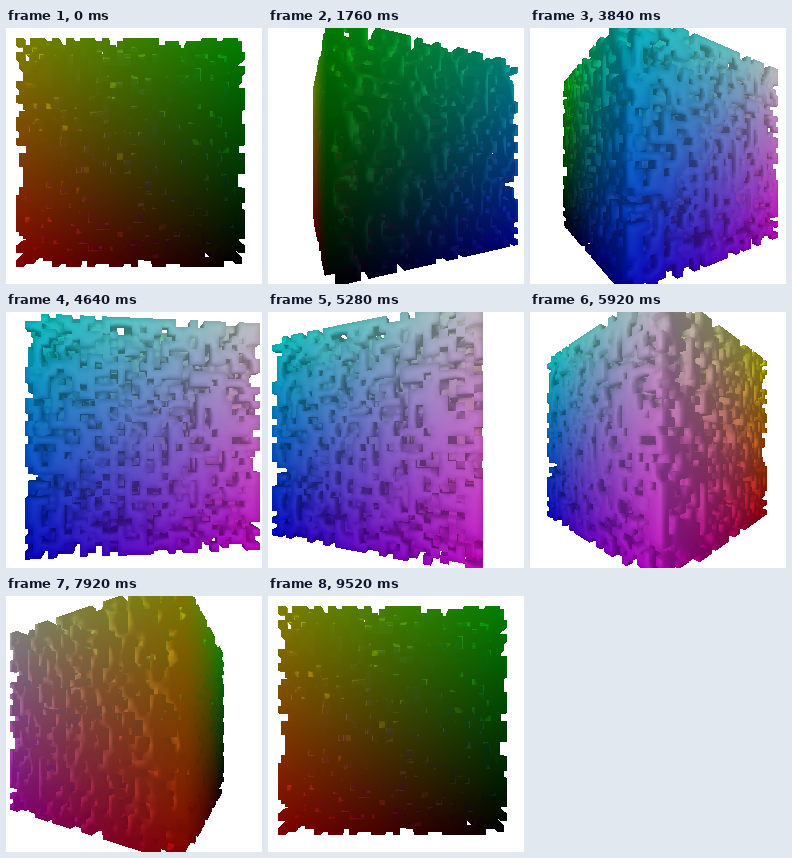
Recreate the animation shown at these times as an HTML page with a canvas. Size 256x256 px, loop 9.6 s.

```html
<!DOCTYPE html>
<html>
<head>
<meta charset="utf-8">
<title>Rotating colour cube</title>
<style>
html, body { margin: 0; width: 100%; height: 100%; overflow: hidden; background: #fff; }
canvas { display: block; width: 100vw; height: 100vh; }
</style>
</head>
<body>
<canvas id="stage" width="256" height="256"></canvas>
<script>
const SIZE = 256, N = 32, M = N + 1;
const FILL = 0.53, SHIFT = 0.03, DIST = 2.9;
const FOCAL = SIZE / 2 / Math.tan(Math.PI / 6);
const STEP = 80, STEPS = 120;
const LIGHT = [0, 0, -1];
const AMBIENT = 0.5, DIFFUSE = 0.23, GLOSS = 0.05;

const ctx = document.getElementById('stage').getContext('2d');
const image = ctx.createImageData(SIZE, SIZE);
const pixels = new Uint32Array(image.data.buffer);

function randomizer(seed) {
  return () => {
    seed = seed + 0x6D2B79F5 | 0;
    let v = Math.imul(seed ^ seed >>> 15, 1 | seed);
    v = v + Math.imul(v ^ v >>> 7, 61 | v) ^ v;
    return ((v ^ v >>> 14) >>> 0) / 4294967296;
  };
}

const random = randomizer(11);
const cells = Uint8Array.from({ length: N * N * N }, () => random() < FILL ? 1 : 0);
const inside = v => v >= 0 && v < N;
const solid = (x, y, z) =>
  inside(x) && inside(y) && inside(z) ? cells[(z * N + y) * N + x] : 0;

// Smooth normals at the lattice corners: they point away from filled cells.
const normals = new Float32Array(M * M * M * 3);
for (let z = 0, at = 0; z < M; z++)
  for (let y = 0; y < M; y++)
    for (let x = 0; x < M; x++, at += 3)
      for (let k = 0; k < 8; k++) {
        const dx = k & 1, dy = k >> 1 & 1, dz = k >> 2;
        if (!solid(x - dx, y - dy, z - dz)) continue;
        normals[at] += dx * 2 - 1;
        normals[at + 1] += dy * 2 - 1;
        normals[at + 2] += dz * 2 - 1;
      }

const org = [0, 0, 0], dir = [0, 0, 0], hit = [0, 0, 0], nrm = [0, 0, 0];
const cell = [0, 0, 0], sign = [0, 0, 0], next = [0, 0, 0], delta = [0, 0, 0];
const low = [0, 0, 0], frac = [0, 0, 0];

function shade(axis) {
  for (let a = 0; a < 3; a++) {
    const v = a === axis ? Math.round(hit[a]) : hit[a];
    low[a] = Math.max(0, Math.min(N - 1, Math.floor(v)));
    frac[a] = v - low[a];
    nrm[a] = a === axis ? -sign[a] * 0.4 : 0;
  }
  for (let k = 0; k < 8; k++) {
    const dx = k & 1, dy = k >> 1 & 1, dz = k >> 2;
    const w = (dx ? frac[0] : 1 - frac[0]) *
              (dy ? frac[1] : 1 - frac[1]) *
              (dz ? frac[2] : 1 - frac[2]);
    if (!w) continue;
    const at = (((low[2] + dz) * M + low[1] + dy) * M + low[0] + dx) * 3;
    for (let a = 0; a < 3; a++) nrm[a] += w * normals[at + a];
  }
  const len = Math.hypot(nrm[0], nrm[1], nrm[2]) || 1;
  const dl = Math.hypot(dir[0], dir[1], dir[2]);
  let lit = 0, half = 0, hl = 0;
  for (let a = 0; a < 3; a++) {
    const h = LIGHT[a] - dir[a] / dl;
    lit += nrm[a] * LIGHT[a] / len;
    half += nrm[a] * h / len;
    hl += h * h;
  }
  const level = AMBIENT + DIFFUSE * Math.max(0, lit);
  const shine = lit > 0 ? GLOSS * Math.pow(Math.max(0, half / Math.sqrt(hl)), 10) : 0;
  const tone = v => Math.max(0, Math.min(255, 255 * (v * level + shine))) | 0;
  const r = tone(1 - hit[0] / N), g = tone(hit[1] / N), b = tone(1 - hit[2] / N);
  return (255 << 24 | b << 16 | g << 8 | r) >>> 0;
}

// Walks one ray through the grid and returns the colour it meets.
function trace() {
  let near = 0, far = 1e9, axis = 0;
  for (let a = 0; a < 3; a++) {
    if (Math.abs(dir[a]) < 1e-9) dir[a] = 1e-9;
    const t0 = -org[a] / dir[a], t1 = (N - org[a]) / dir[a];
    const enter = Math.min(t0, t1);
    if (enter > near) { near = enter; axis = a; }
    far = Math.min(far, Math.max(t0, t1));
  }
  if (near >= far) return 0xffffffff;
  for (let a = 0; a < 3; a++) {
    sign[a] = dir[a] > 0 ? 1 : -1;
    delta[a] = Math.abs(1 / dir[a]);
    const p = org[a] + dir[a] * near;
    cell[a] = Math.max(0, Math.min(N - 1, Math.floor(p)));
    next[a] = (cell[a] + (sign[a] > 0 ? 1 : 0) - org[a]) / dir[a];
  }
  let t = near;
  while (inside(cell[axis])) {
    if (cells[(cell[2] * N + cell[1]) * N + cell[0]]) {
      for (let a = 0; a < 3; a++) hit[a] = org[a] + dir[a] * t;
      return shade(axis);
    }
    axis = next[0] < next[1] ? (next[0] < next[2] ? 0 : 2) : (next[1] < next[2] ? 1 : 2);
    t = next[axis];
    next[axis] += delta[axis];
    cell[axis] += sign[axis];
  }
  return 0xffffffff;
}

function draw(angle) {
  const c = Math.cos(angle), s = Math.sin(angle), unit = N / 2;
  org[0] = (DIST * s + 1 + SHIFT) * unit;
  org[1] = (1 - SHIFT) * unit;
  org[2] = (DIST * c + 1 + SHIFT) * unit;
  for (let y = 0; y < SIZE; y++)
    for (let x = 0; x < SIZE; x++) {
      const vx = (x + 0.5 - SIZE / 2) / FOCAL;
      dir[0] = vx * c - s;
      dir[1] = (SIZE / 2 - y - 0.5) / FOCAL;
      dir[2] = -vx * s - c;
      pixels[y * SIZE + x] = trace();
    }
  ctx.putImageData(image, 0, 0);
}

let shown = -1;
function tick() {
  const step = Math.floor(performance.now() / STEP) % STEPS;
  if (step !== shown) {
    shown = step;
    draw(step / (STEPS - 1) * 2 * Math.PI);
  }
  requestAnimationFrame(tick);
}
tick();
</script>
</body>
</html>
```
